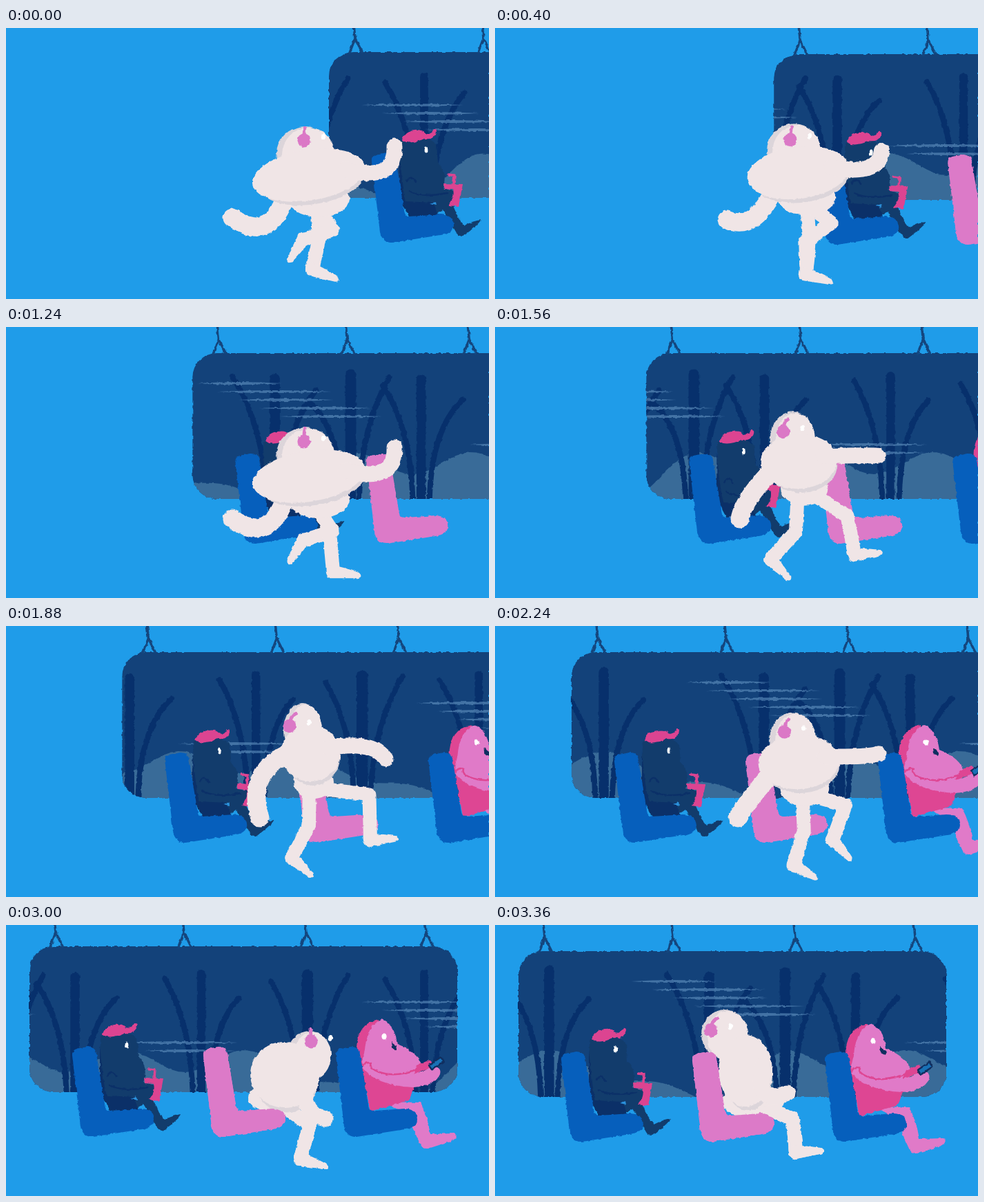
Write an HTML page that moves like this. It is 700 by 394 pixels and loops after 3.4 s.

```html
<!DOCTYPE html>
<html lang="en">
<head>
<meta charset="utf-8">
<title>Finding a seat</title>
<style>
html, body { margin: 0; width: 100%; height: 100%; overflow: hidden; background: #1f9ce9; }
svg { display: block; width: 100%; height: 100%; }
.line { fill: none; stroke-linecap: round; stroke-linejoin: round; }
</style>
</head>
<body>
<svg viewBox="0 0 700 394">
  <defs>
    <filter id="rough" filterUnits="userSpaceOnUse" x="0" y="0" width="700" height="394" color-interpolation-filters="sRGB">
      <feTurbulence type="fractalNoise" baseFrequency=".16" numOctaves="2" seed="4"/>
      <feColorMatrix values="1 0 0 0 0  0 1 0 0 0  0 0 1 0 0  0 0 0 0 1" result="noise"/>
      <feDisplacementMap in="SourceGraphic" in2="noise" scale="4" xChannelSelector="R" yChannelSelector="G"/>
    </filter>
    <clipPath id="pane"><rect id="paneRect" y="38" width="620" height="212" rx="35"/></clipPath>
    <path id="seat" d="M96 197Q95 187 108 186L118 184Q130 184 131 195L143 268Q144 278 152 277L196 274Q215 275 215 290Q214 301 196 304L126 315Q112 316 108 300Z"/>
  </defs>
  <g filter="url(#rough)">
    <g clip-path="url(#pane)">
      <rect width="700" height="394" fill="#13427a"/>
      <g id="scenery"></g>
    </g>
    <g id="bus">
      <g id="straps" class="line" stroke="#14467e" stroke-width="3.5"></g>
      <g id="drinker">
        <path fill="#123c6c" d="M137 168Q165 150 190 172L192 198Q207 214 199 236L216 240Q222 252 212 257L222 280L230 290Q244 283 254 282Q252 288 228 306Q221 306 219 301L199 267Q184 280 150 276L136 250Z"/>
        <path fill="#0b3068" d="M136 182Q141 240 146 255L185 257L192 275L150 277L136 250Z"/>
        <path class="line" stroke="#0b3068" stroke-width="2.5" d="M147 226Q153 215 160 227M150 240Q170 250 205 243"/>
        <path fill="#2b91dc" d="M181 259L189 256L190 261Z"/>
        <path fill="#dc4491" d="M200 229L228 230L222 263L207 261Q217 250 214 238L201 237Z"/>
        <path class="line" stroke="#dc4491" stroke-width="3.5" d="M207 216L216 217L215 229"/>
        <path fill="#dc4491" d="M140 166Q143 153 158 152Q171 150 174 156Q181 159 186 150Q192 149 189 157Q184 166 172 164Q158 171 145 169Z"/>
        <ellipse cx="175" cy="181" rx="2.4" ry="4.6" fill="#fff"/>
      </g>
      <g id="reader">
        <path fill="#e07ac8" d="M550 264L600 265Q611 285 615 311L650 310Q657 315 646 321L612 332Q601 333 600 325L580 282Z"/>
        <path fill="#de4693" d="M508 192Q507 150 540 144L560 200L602 214L584 262L528 278L515 210Z"/>
        <path fill="#e07ac8" d="M520 189Q523 152 544 144Q563 150 567 180Q598 192 603 213Q596 240 560 232Q520 225 516 206Z"/>
        <path fill="#de4693" d="M596 211L614 203Q620 208 616 215L590 224Z"/>
        <path class="line" stroke="#de4693" stroke-width="2.5" d="M517 212Q522 205 529 208Q525 215 541 221Q565 229 594 217"/>
        <path fill="#e07ac8" d="M520 212Q530 228 570 228Q598 226 616 213Q632 212 629 224Q622 241 590 243Q535 240 516 214Z"/>
        <path fill="#102f60" d="M558 177L567 184L565 189L559 186Z"/>
        <ellipse cx="548" cy="169" rx="3.6" ry="4.6" fill="#fff"/>
        <rect x="613" y="204" width="21" height="8" rx="1" transform="rotate(-34 624 208)" fill="#1871b5" stroke="#102f60" stroke-width="2.5"/>
      </g>
      <use href="#seat" fill="#065fbc"/>
      <use href="#seat" x="190" fill="#dc7ac8"/>
      <use href="#seat" x="382" fill="#065fbc"/>
    </g>
    <g id="walker"></g>
    <use id="frontSeat" href="#seat" x="190" fill="#dc7ac8"/>
  </g>
</svg>
<script>
const $ = id => document.getElementById(id);
const LOOP = 3400, STEP = 40, WALK = 880, SIT = 2760;
const LIGHT = '#f0e5e6', SHADE = '#dcd5da', PINK = '#db78c6';

let seed = 7;
const rnd = () => (seed = seed * 16807 % 2147483647) / 2147483647;
const wave = (x, top, period) => Math.cos((x - top) * 2 * Math.PI / period);
const stroke = (d, w, color = LIGHT) => `<path class="line" stroke="${color}" stroke-width="${w}" d="${d}"/>`;

// Hills: short bumps with a wide valley now and then
function hills() {
  let d = 'M-660 260';
  for (let x = -660; x <= 760; x += 10)
    d += `L${x} ${198 - 16 * wave(x, 345, 172) + 55 * Math.max(0, wave(x, -145, 685)) ** 3}`;
  return `<path fill="#396b98" d="${d}V260Z"/>`;
}
// A clump: one upright trunk between two stems that lean outwards
const clump = x => [-1, 0, 1].map(side => {
  const tip = x + side * (52 + 12 * rnd()), base = x + side * 12;
  const top = 66 + (side ? 45 : 10) * rnd(), width = side ? 8 : 9 + 8 * rnd();
  return stroke(`M${tip} ${top}Q${base} 150 ${base} 265`, width, '#07306c');
}).join('');
const streaks = ([x, y, rows]) => Array.from({ length: rows }, (_, i) => {
  const l = 110 + 60 * rnd();
  return `<path fill="#6b9cc8" opacity=".55" d="M${x + 30 * i} ${y + 12 * i}q${l / 2} -4 ${l} 0q${-l / 2} 4 ${-l} 0"/>`;
}).join('');

$('scenery').innerHTML = hills() +
  [-570, -470, -344, -112, -2, 100, 283, 437, 606].map(clump).join('') +
  [[-225, 82, 5], [515, 112, 4], [170, 171, 2]].map(streaks).join('');
$('straps').innerHTML = [71, 257, 434, 608].map(x =>
  `<path d="M${x - 2} -12L${x + 1} 18L${x - 7} 39M${x + 1} 18L${x + 11} 38"/>`).join('');

const mix = (a, b, k) => Array.isArray(a) ? a.map((v, i) => mix(v, b[i], k)) : a + (b - a) * k;
const smooth = k => (1 - Math.cos(Math.PI * k)) / 2;
function at(keys, t, ease = k => k) {
  const i = Math.max(1, keys.findIndex(([time]) => time >= t));
  const [t0, a] = keys[i - 1], [t1, b] = keys[i];
  return mix(a, b, ease((t - t0) / (t1 - t0)));
}

// Body: head (x, y, rx, ry, ear offset), torso (x, y, rx, ry, turn), hip, back arm and front arm (bend, hand)
const low = [[434,185,42,39,-2], [439,217,82,37,-9], [453,251,45,27], [395,325,328,279], [565,228,563,175]];
const tall = [[430,152,28,40,-19], [441,185,43,41,0], [446,227,29,24], [345,205,368,279], [530,166,550,193]];
const stoop = [[440,195,31,34,2], [404,225,50,48,10], [393,258,42,22], [375,245,395,262], [422,280,463,289]];
const seated = [[333,159,34,36,-20], [363,212,39,52,0], [374,256,45,26], [360,255,395,250], [374,264,424,244]];

// Foot: ankle x, y, toe angle, knee bend
const lifted = [432, 310, 115, 35];
const stepPath = [[0, lifted], [120, [528,310,-10,42]], [290, [514,350,-14,3]], [400, [451,357,10,5]],
  [560, [415,336,35,12]], [800, [385,338,43,24]], [WALK, lifted]];
const farClock = [[0, 430], [120, 560], [300, 800], [360, 880], [560, 1000], [800, 1170], [WALK, 1310]];
const stretch = [[0, 0], [120, 1], [360, 0], [560, 1], [800, .35], [WALK, 0]];

function walkPose(t) {
  return [...mix(low, tall, at(stretch, t)), at(stepPath, t), at(stepPath, at(farClock, t) % WALK)];
}
const sitPose = (body, foot) => [...body, foot, foot];
const rest = sitPose(seated, [436, 329, -10, 26]);
const sitKeys = [[SIT, walkPose(SIT % WALK)], [3000, sitPose(stoop, [427, 346, 10, 28])], [3240, rest], [LOOP, rest]];

const oval = ([x, y, rx, ry], fill, turn = 0, dx = 0, dy = 0) =>
  `<ellipse cx="${x + dx}" cy="${y + dy}" rx="${rx - dx}" ry="${ry}" transform="rotate(${turn} ${x} ${y})" fill="${fill}"/>`;

function leg([hipX, hipY], [x, y, angle, bend]) {
  const hx = hipX + .2 * (x - hipX), hy = hipY + 10, d = Math.hypot(x - hx, y - hy);
  const kx = (hx + x) / 2 + (y - hy) / d * bend, ky = (hy + y) / 2 - (x - hx) / d * bend;
  return stroke(`M${hx} ${hy}L${kx} ${ky}L${x} ${y}`, 20) +
    `<path transform="translate(${x} ${y}) rotate(${angle})" fill="${LIGHT}" d="M-9 -8Q6 -9 38 2Q44 8 36 10L-4 11Q-13 6 -9 -8Z"/>`;
}

function drawWalker([head, torso, hip, back, front, near, far]) {
  const [tx, ty, rx, , turn] = torso;
  const arm = (side, [cx, cy, x, y], w) => stroke(`M${tx + side * rx} ${ty - 8}Q${cx} ${cy} ${x} ${y}`, w);
  const ear = head[4], x = head[0] + ear, y = head[1] - 20 + Math.abs(ear) * .7;
  return leg(hip, far) + leg(hip, near) + oval(hip, LIGHT) + arm(-.3, back, 27) +
    oval(head, SHADE) + oval(head, LIGHT, 0, 4, 2) +
    oval(torso, SHADE, turn, 4, 6) + oval(torso, LIGHT, turn) + arm(.65, front, 23) +
    stroke(`M${x} ${y}Q${x} ${y - 14} ${x - ear * .5} ${y - 18}`, 5, PINK) + oval([x, y, 9.5, 10], PINK) +
    oval([x + 28, y - 5, 3, 4.5], '#fff', 15);
}

const jolt = t => -[[0, 3], [800, 5], [3000, 7]]
  .reduce((sum, [time, height]) => sum + height * Math.exp(-(((t - time) / 160) ** 2)), 0);

function render(now) {
  const t = Math.floor(now % LOOP / STEP) * STEP;
  const scroll = Math.max(0, 434 - t * .1594), y = jolt(t);
  const phase = (t + 999) % 1000 + 1;
  const move = (id, x, y) => $(id).setAttribute('transform', `translate(${x} ${y})`);
  move('scenery', .66 * (1000 - phase), 0);
  move('paneRect', 34 + scroll, y);
  move('bus', scroll, y);
  move('walker', 0, y);
  move('frontSeat', 0, y);
  $('frontSeat').style.display = t > 2800 ? '' : 'none';
  $('walker').innerHTML = drawWalker(t < SIT ? walkPose(t % WALK) : at(sitKeys, t, smooth));
  requestAnimationFrame(() => render(performance.now() - start));
}
const start = performance.now();
render(0);
</script>
</body>
</html>
```
